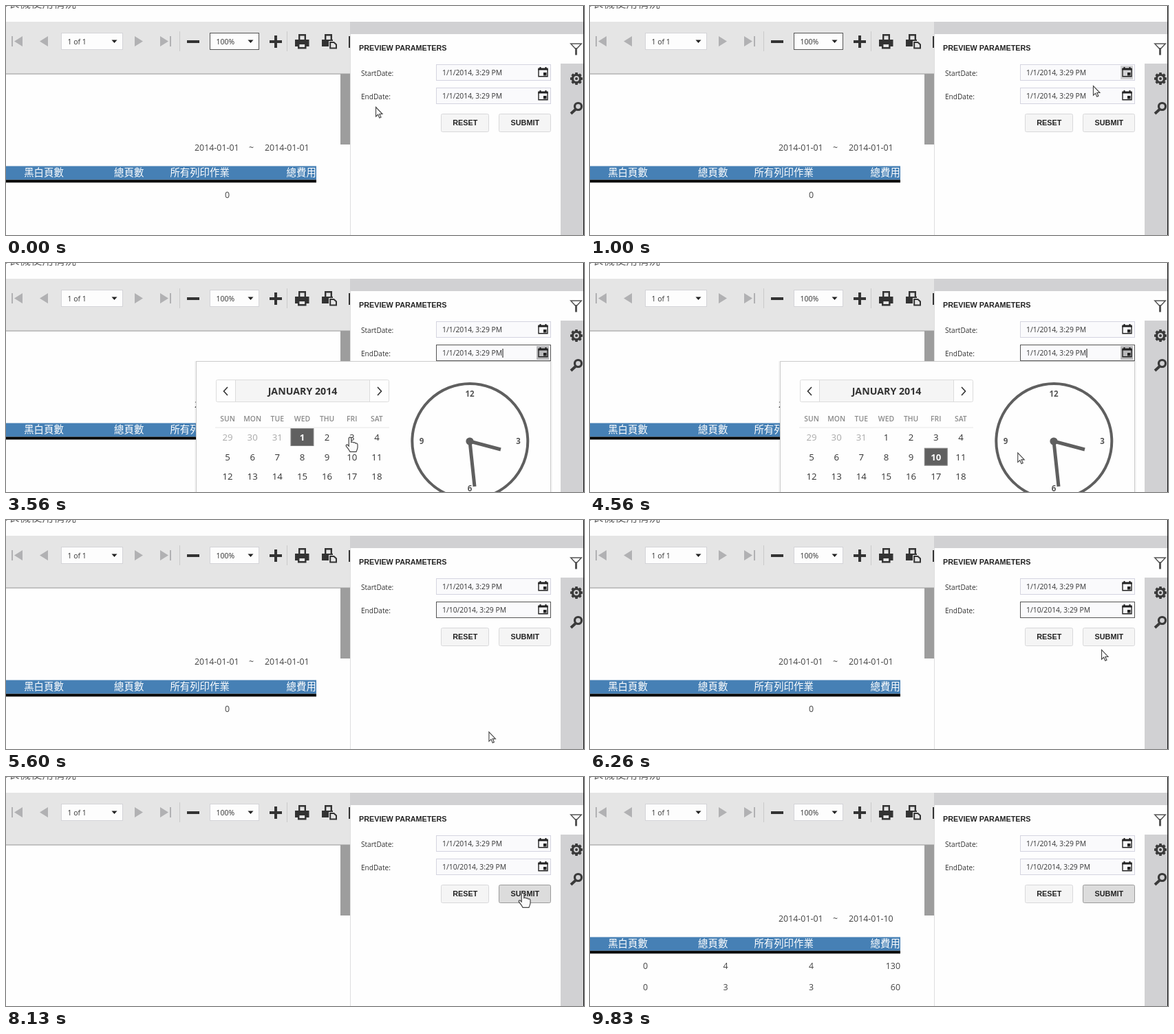
These frames come from a looping animation (840 px wide and 334 px high, 10 s). An HTML page:

```html
<!DOCTYPE html>
<html lang="en">
<head>
<meta charset="utf-8">
<title>Report preview</title>
<style>
html, body { margin: 0; width: 100%; height: 100%; overflow: hidden; background: #fefefe; }
svg { display: block; width: 840px; height: 334px; }
text { font-family: "Open Sans", "Noto Sans", sans-serif; fill: #333; white-space: pre; }
.cjk { font-family: "Noto Sans CJK TC", "Noto Sans CJK", sans-serif; }
.caps { font: bold 10.8px "Liberation Sans", Arial, sans-serif; fill: #222; }
.mid { text-anchor: middle; }
.end { text-anchor: end; }
.head { font-size: 14.4px; font-weight: 500; fill: #fff; }
.num { font-size: 12.4px; fill: #444; }
.day { font-size: 13.2px; }
</style>
</head>
<body>
<svg id="stage" viewBox="0 0 840 334"></svg>
<script>
const LOOP = 10000;
const $ = id => document.getElementById(id);

const rect = (x, y, w, h, fill, extra = '') =>
  `<rect x="${x}" y="${y}" width="${w}" height="${h}" fill="${fill}" ${extra}/>`;
const path = (d, fill, extra = '') => `<path d="${d}" fill="${fill}" ${extra}/>`;
const line = (d, color, width = 1, extra = '') =>
  path(d, 'none', `stroke="${color}" stroke-width="${width}" ${extra}`);
const text = (x, y, s, size, cls = '', extra = '') =>
  `<text x="${x}" y="${y}" class="${cls}" ${size ? `font-size="${size}"` : ''} ${extra}>${s}</text>`;
const group = (id, body, extra = '') => `<g id="${id}" ${extra}>${body}</g>`;
const circle = (x, y, r, fill, extra = '') => `<circle cx="${x}" cy="${y}" r="${r}" fill="${fill}" ${extra}/>`;

const combo = (id, x, w, label) =>
  rect(x + .5, 39.5, w, 24, '#fdfdfd', `id="${id}" stroke="#d4d4d8"`) +
  text(x + 9.5, 55.7, label, 10.5, '', `id="${id}Text"`) +
  path(`M${x + w - 15.5} 49.5h8l-4 4.5z`, '#222');

const field = (id, y) =>
  rect(625.5, y + .5, 166, 23, '#fafafc', `id="${id}Box" stroke="#d4d4e0"`) +
  rect(771, y + 2, 18, 20, '#d2d2d4', `id="${id}Button"`) +
  text(634, y + 15.8, '1/1/2014, 3:29 PM', 10.35, '', `id="${id}Text"`) +
  line(`M774 ${y + 7}V${y + 17.7}H787V${y + 7}`, '#222', 1.4) +
  rect(773.3, y + 5.5, 14.4, 3, '#222') +
  rect(775.5, y + 4, 2, 2, '#222') + rect(783.5, y + 4, 2, 2, '#222') +
  rect(781, y + 12, 4.5, 4.5, '#222');

const button = (id, x, w, label) =>
  rect(x + .5, 157.5, w, 26, '#f5f5f5', `id="${id}" rx="2" stroke="#d8d8da"`) +
  text(x + w / 2 + .8, 174, label, 0, 'caps mid');

function toolbar() {
  const bar = '#e5e5e5', nav = '#b1b1b3', ink = '#333';
  return rect(0, 23, 500, 76, bar) + rect(0, 98, 500, 2, '#c2c2c2') +
    rect(8, 44, 2, 15, nav) + path('M24 44v15l-12-7.5zM61 44v15l-12-7.5zM187 44v15l12-7.5zM224 44v15l12-7.5z', nav) +
    rect(238, 44, 2, 15, nav) +
    line('M252.5 37V66M408.5 37V66', '#cacaca') +
    combo('pages', 80, 89, '1 of 1') + combo('zoom', 296, 71, '100%') +
    group('tools',
      rect(263, 50, 18, 4, ink) + rect(383, 50, 18, 4, ink) + rect(390, 43, 4, 18, ink) +
      line('M426.2 49V42.2H434.8V49', ink, 2.4) + rect(420, 49, 20.5, 10, ink) +
      path('M425.2 54.7H435.3V61.3H425.2z', bar, `stroke="${ink}" stroke-width="2.4"`) +
      line('M464.2 49V42.2H472.8V49', ink, 2.4) + path('M459 49H475V51H469V59H459z', ink) +
      path('M471.2 53H476.5L480 56.2V61.5H471.2z', bar, `stroke="${ink}" stroke-width="2"`) +
      rect(498, 44, 2, 17, ink));
}

function report() {
  const rows = [[280, ['0', '4', '4', '130']], [311, ['0', '3', '3', '60']]];
  const ends = [84, 200.5, 325, 451];
  const heads = ['黑白頁數', '總頁數', '所有列印作業', '總費用'];
  return group('report',
    text(274, 211, '2014-01-01', 12.3, 'num') + text(353, 211, '~', 12.3, 'num') +
    text(376, 211, '', 12.3, 'num', 'id="until"') +
    rect(0, 233.5, 451, 20, '#4680b5') + rect(0, 253.5, 451, 4, '#000') +
    heads.map((s, i) => text(ends[i] - .2, 248.3, s, 0, 'cjk head end')).join('') +
    group('empty', text(325, 280, '0', 0, 'num end')) +
    group('filled', rows.map(([y, cells]) =>
      cells.map((s, i) => text(ends[i], y, s, 0, 'num end')).join('')).join('')));
}

function sidebar() {
  const ink = '#3a3a3a';
  const teeth = Array.from({ length: 8 }, (_, i) =>
    rect(827.2, 97, 3.6, 4, ink, `transform="rotate(${i * 45} 829 106)"`)).join('');
  return rect(500, 23, 340, 18, '#d1d1d3') + rect(500, 41, 306, 293, '#fefefe') +
    rect(500, 41, 1, 293, '#dededf') + rect(806, 41, 34, 43, '#fefefe') +
    rect(806, 84, 34, 250, '#d1d1d3') +
    line('M820.8 55H836.2L829.8 62H827.2z', '#555', 1.5) + rect(827, 61, 3, 10.5, '#555') +
    group('tabs', teeth + circle(829, 106, 5.6, 'none', `stroke="${ink}" stroke-width="3.4"`) +
      circle(829, 106, 2, ink) +
      circle(831.5, 146.5, 5, 'none', `stroke="${ink}" stroke-width="3.2"`) +
      line('M827.5 151L821 157', ink, 3.8)) +
    rect(839, 0, 1, 334, '#111');
}

function parameters() {
  return text(513, 65, 'PREVIEW PARAMETERS', 0, 'caps') +
    group('form', text(516, 102, 'StartDate:', 10.1) + text(516, 136, 'EndDate:', 10.1) +
      field('start', 85) + field('finish', 119) +
      rect(721.5, 125, 1, 13, '#111', 'id="caret"') +
      button('reset', 632, 69, 'RESET') + button('submit', 716, 75, 'SUBMIT'));
}

const dayX = i => 322 + i * 36.15;
const rowY = r => 254 + r * 28.7;

function calendar() {
  const names = ['SUN', 'MON', 'TUE', 'WED', 'THU', 'FRI', 'SAT'];
  let days = '';
  for (let i = 0; i < 21; i++) {
    const n = i < 3 ? 29 + i : i - 2;
    days += text(dayX(i % 7), rowY(i / 7 | 0) + 4.8, n, 0, 'day mid', i < 3 ? 'style="fill:#aaa"' : '');
  }
  return rect(305.5, 170.5, 251, 32, '#fefefe', 'stroke="#dcdcdc" rx="2"') +
    rect(333.5, 170.5, 195, 32, '#f5f5f5', 'stroke="#dcdcdc"') +
    line('M322 181L316.5 187L322 193M540 181L545.5 187L540 193', '#333', 1.6) +
    text(431, 192, 'JANUARY 2014', 14.2, 'mid', 'font-weight="700"') +
    names.map((s, i) => text(dayX(i), 230.5, s, 10.4, 'mid', 'font-weight="600" style="fill:#8a8a8a"')).join('') +
    rect(304, 239.5, 253, 1, '#e8e8e8') + days +
    group('picked', rect(-16.5, -12.5, 33, 25, '#606060', 'stroke="#858585"') +
      text(0, 4.8, '', 0, 'day mid', 'id="pickedText" font-weight="700" style="fill:#fff"'));
}

function clock() {
  const ink = '#5f5f5f';
  const mark = (x, y, s) => text(x, y + 4.2, s, 11.5, 'mid', 'font-weight="700" style="fill:#555"');
  return circle(674.3, 260, 84, 'none', `stroke="${ink}" stroke-width="4"`) +
    mark(674, 191, 12) + mark(744.5, 260, 3) + mark(674, 328.5, 6) + mark(604, 260, 9) +
    line('M674 260L719 272M674 260L681 326', ink, 5) + circle(674, 260, 5.6, ink);
}

function popup() {
  return group('popup',
    rect(274, 143, 520, 200, '#000', 'opacity=".04"') +
    rect(276.5, 143.5, 515, 200, '#fefefe', 'stroke="#cbcbcb"') + calendar() + clock());
}

const arrow = path('M.5 .5V14.2L3.6 11.3L5.8 16.3L8 15.3L5.8 10.5H10z', '#fafafa',
  'id="arrow" stroke="#444" stroke-width="1.1"');
const hand = path('M-1.8 1.2Q0 -1 1.8 1.2V7.5Q4 6.2 5 8Q7 7 8 9Q10.8 8.2 11 11V15Q10.5 18 9 21.3H0Q-1.5 18 -5.7 13Q-6.2 10.5 -3.8 11L-1.8 13z',
  '#fafafa', 'id="hand" stroke="#444" stroke-width="1.2"');

$('stage').innerHTML = rect(0, 0, 840, 334, '#fefefe') +
  text(-13.5, 2.2, '印表機使用情況', 16.5, 'cjk', 'style="fill:#666"') +
  toolbar() + rect(486, 99, 14, 103, '#9d9d9d') + report() + sidebar() +
  parameters() + popup() + group('cursor', arrow + hand);

// time, x, y of the pointer tip
const track = [
  [0, 537, 147], [360, 537, 147], [560, 650, 118], [760, 788, 78], [880, 781, 98],
  [1000, 731, 116], [1330, 715, 127], [1530, 715, 127], [1760, 788, 136], [1930, 776, 134],
  [2730, 776, 134], [3050, 640, 190], [3400, 500, 254], [3560, 500, 254], [4030, 503, 281],
  [4200, 503, 281], [4560, 621, 276], [4720, 655, 340], [5430, 690, 338], [6000, 728, 240],
  [6260, 743, 189], [6430, 746, 177], [6730, 751, 169], [9530, 751, 169], [9830, 650, 208]
];

function pointer(t) {
  const i = track.findIndex(k => k[0] > t);
  if (i < 0) return track.at(-1).slice(1);
  const [t0, x0, y0] = track[i - 1], [t1, x1, y1] = track[i];
  const p = (t - t0) / (t1 - t0);
  return [x0 + (x1 - x0) * p, y0 + (y1 - y0) * p];
}

const set = (id, name, value) => $(id).setAttribute(name, value);
const show = (id, on) => set(id, 'visibility', on ? 'inherit' : 'hidden');
const between = (t, a, b) => t >= a && t < b;

function draw(t) {
  const [x, y] = pointer(t);
  const inside = (l, top, r, b) => x >= l && x <= r && y >= top && y <= b;
  const open = between(t, 2460, 5430);
  const focused = between(t, 2460, 6490);
  const pressed = t >= 6490;
  const loading = between(t, 7060, 8130);
  const loaded = t >= 8360;
  const onReset = !open && inside(632, 157, 702, 184);
  const onSubmit = !open && inside(716, 157, 792, 184);
  const onDays = open && inside(305, 171, 557, 334);
  const onStart = inside(771, 86, 790, 108);
  const onFinish = inside(771, 120, 790, 142);

  set('zoom', 'stroke', t < 2460 ? '#555' : '#d4d4d8');
  $('pagesText').textContent = loading ? '0 of 0' : '1 of 1';
  set('tools', 'opacity', loading ? .35 : 1);
  set('tabs', 'opacity', loading ? .35 : 1);
  set('form', 'opacity', between(t, 7060, 7800) ? .5 : 1);

  show('report', t < 7060 || loaded);
  show('empty', t < 7060);
  show('filled', loaded);
  $('until').textContent = loaded ? '2014-01-10' : '2014-01-01';

  show('startButton', onStart || between(t, 800, 1030));
  show('finishButton', open || (t < 2460 && onFinish));
  set('finishButton', 'fill', between(t, 2200, 5430) ? '#b9b9bb' : '#d2d2d4');
  set('finishBox', 'stroke', focused ? '#555' : '#d4d4e0');
  $('finishText').textContent = `1/${t >= 5430 ? 10 : 1}/2014, 3:29 PM`;
  show('caret', open && Math.floor((t - 2450) / 500) % 2 === 0);

  set('reset', 'fill', onReset ? '#e6e6e6' : '#f5f5f5');
  set('submit', 'fill', pressed ? '#dcdcdc' : onSubmit ? '#e6e6e6' : '#f5f5f5');
  set('submit', 'stroke', pressed ? '#9a9a9a' : '#d8d8da');

  show('popup', open);
  const later = t >= 4200;
  set('picked', 'transform', `translate(${dayX(later ? 5 : 3)} ${rowY(later ? 1 : 0)})`);
  $('pickedText').textContent = later ? 10 : 1;

  const pointing = onReset || onSubmit || onDays || onStart || onFinish;
  show('cursor', t < 9830);
  set('cursor', 'transform', `translate(${x} ${y})`);
  show('arrow', !pointing);
  show('hand', pointing);
}

function frame() {
  draw(performance.now() % LOOP);
  requestAnimationFrame(frame);
}
frame();
</script>
</body>
</html>
```
